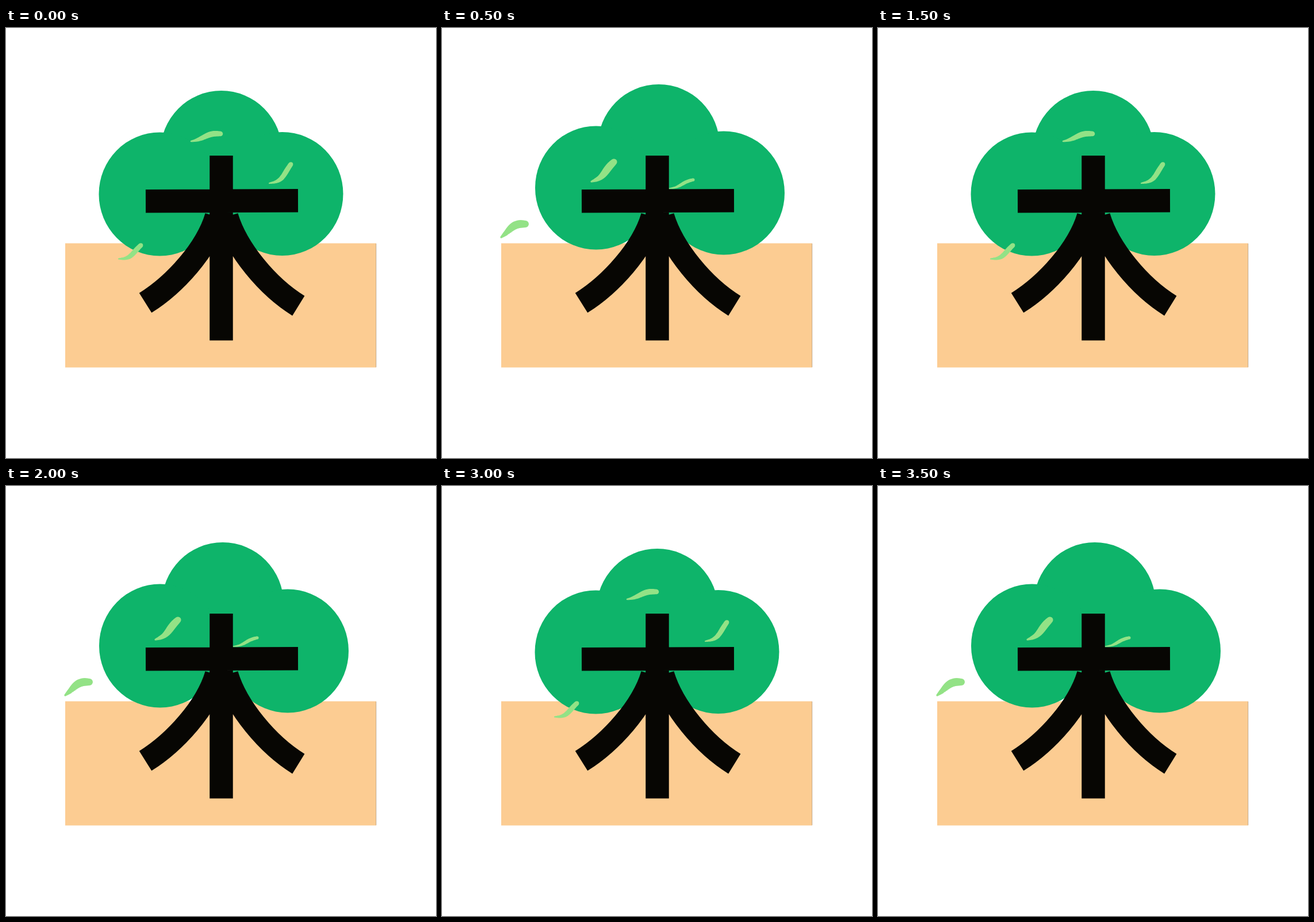
Animation, 748 px wide and 748 px high, one loop 6000 ms. Source, as an HTML page with a canvas:

```html
<!DOCTYPE html>
<html lang="ja">
<head>
<meta charset="utf-8">
<title>木</title>
<style>
html, body { margin: 0; width: 100%; height: 100%; overflow: hidden; background: #fff; }
canvas { display: block; }
</style>
</head>
<body>
<canvas id="stage" width="748" height="748"></canvas>
<script>
const ctx = document.getElementById('stage').getContext('2d');
const LOOP = 6000, STEP = 500, LAST_STEP = 7;

const glyph = new Path2D(
  'M374.5 222V543.5M243 301.2L508 300.3' +
  'M366 328C349 385 294 446 242.5 478.2M384 328C401 385 455 450 508.8 483.2');

function lobe(x, y) {
  ctx.fillStyle = '#0eb46a';
  ctx.beginPath();
  ctx.ellipse(x, y, 106, 107.5, 0, 0, 2 * Math.PI);
  ctx.fill();
}

// A tapered blade from tail (x0, y0) to head (x1, y1); a positive bend arches it upwards.
function leaf(x0, y0, x1, y1, bend, radius) {
  const dx = x1 - x0, dy = y1 - y0, length = Math.hypot(dx, dy);
  ctx.fillStyle = '#93e286';
  ctx.beginPath();
  for (let t = 0; t <= 1; t += 1 / 64) {
    const rise = bend * Math.sin(Math.PI * t) / length - .03 * Math.sin(2 * Math.PI * t);
    const x = x0 + dx * t + dy * rise;
    const y = y0 + dy * t - dx * rise;
    const r = radius * (.25 + .75 * Math.sin(2.2 * t));
    ctx.moveTo(x + r, y);
    ctx.arc(x, y, r, 0, 2 * Math.PI);
  }
  ctx.fill();
}

const poses = [
  function calm() {
    lobe(374.5, 216.5);
    lobe(267.5, 289);
    lobe(480.5, 288.5);
    leaf(322, 197, 373, 184, 2, 5);
    leaf(458, 270, 495.5, 237, -7, 4.5);
    leaf(196, 401.5, 234.5, 378, -6, 4.5);
  },
  function gust() {
    lobe(377, 205.5);
    lobe(268, 278);
    lobe(490, 287);
    leaf(260, 267, 299, 233, -4, 6.5);
    leaf(395, 279, 437, 264, -1, 3);
    leaf(103, 364, 145, 341, 6, 7);
  },
  function scatter() {
    lobe(362, 210.5);
    lobe(272.5, 295.5);
    lobe(484, 273);
    leaf(178, 277, 231, 248, 5, 6);
    leaf(53, 328, 87.5, 326.5, -4, 4.2);
    leaf(182, 399.5, 228, 353, -7, 4);
    leaf(295, 364.5, 338, 336, -2, 4);
    leaf(118, 485, 169.5, 467, 4, 7.5);
  }
];

function draw(time) {
  const step = Math.min(Math.floor(time % LOOP / STEP), LAST_STEP);
  ctx.fillStyle = '#fff';
  ctx.fillRect(0, 0, 748, 748);
  ctx.fillStyle = '#fccc92';
  ctx.fillRect(103, 374.5, 541, 216);
  ctx.fillStyle = '#a89880';
  ctx.fillRect(643.5, 375, .7, 215);
  poses[step % poses.length]();
  ctx.strokeStyle = '#070603';
  ctx.lineWidth = 40.5;
  ctx.stroke(glyph);
}

const start = performance.now();
function tick() {
  draw(performance.now() - start);
  requestAnimationFrame(tick);
}
tick();
</script>
</body>
</html>
```
